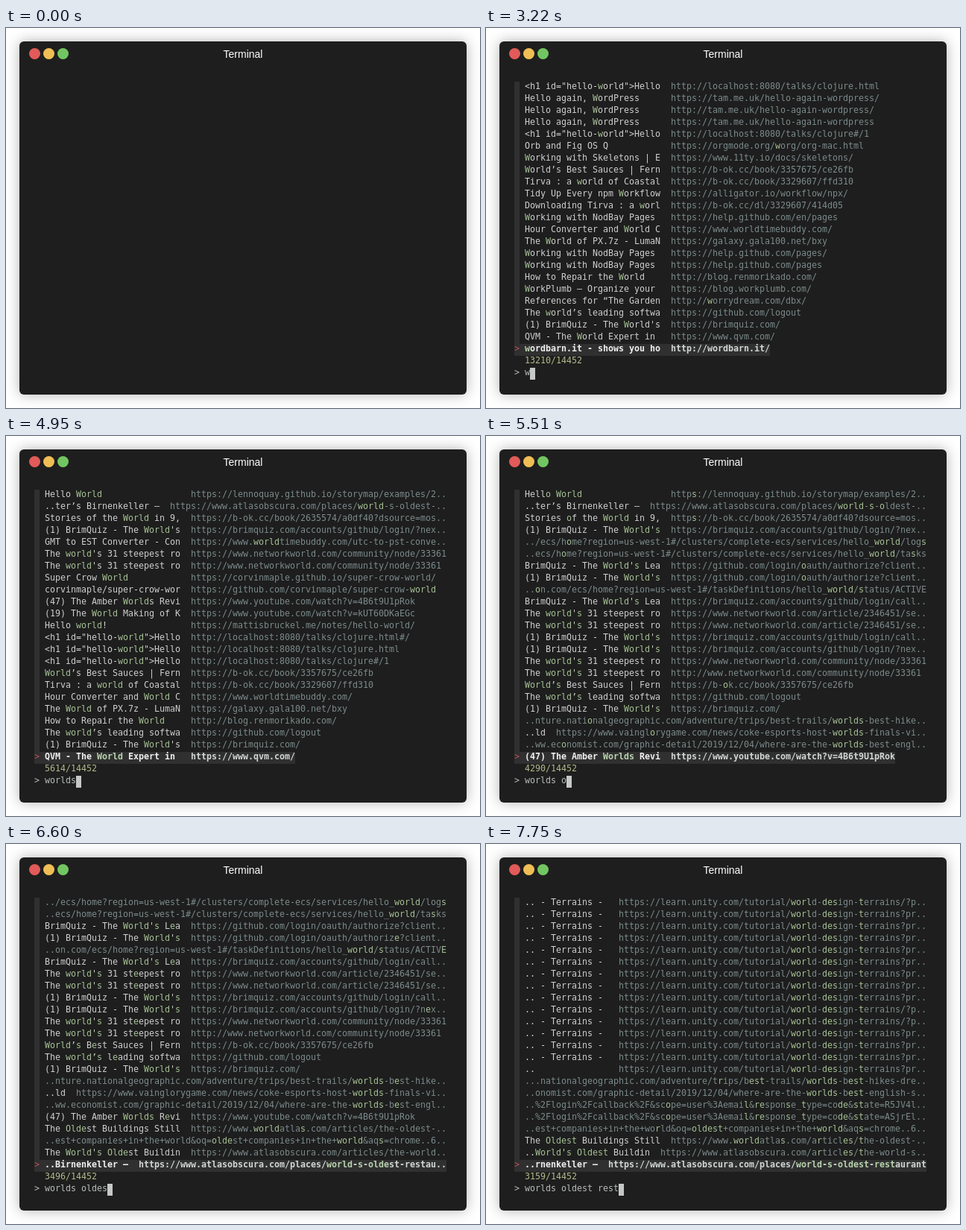
Recreate the animation shown at these times as an HTML page. Size 636 by 510 pixels, loop 8000 ms.

```html
<!DOCTYPE html>
<html lang="en">
<head>
<meta charset="utf-8">
<title>Terminal</title>
<style>
  html, body { margin: 0; width: 100%; height: 100%; overflow: hidden; background: #fff; }
  #stage { position: relative; width: 636px; height: 510px; overflow: hidden; }
  #window {
    position: absolute; left: 18px; top: 18px; width: 600px; height: 474px;
    border-radius: 6px; background: #1e1e1e; box-shadow: 0 0 18px rgba(0, 0, 0, .3);
  }
  .button { position: absolute; top: 27px; width: 15px; height: 15px; border-radius: 50%; }
  #title {
    position: absolute; left: 18px; top: 27px; width: 600px; text-align: center; color: #fff;
    font: 14px/16px "Liberation Sans", Arial, sans-serif;
  }
  #screen { font: 11.63px/14px "DejaVu Sans Mono", monospace; color: #cfcfcf; }
  .text { position: absolute; white-space: pre; height: 14px; }
  .fill { position: absolute; height: 16px; background: #303030; }
  .url { color: #7c8a8a; }
  .hit { color: #a6c194; }
  .selected { font-weight: bold; color: #f0f0f0; }
  .selected .url { color: #d2d6d6; }
  .selected .hit { color: #b9d3ae; }
  .pointer { color: #b9505e; }
  .count { color: #b1ba8a; }
  .path { color: #94dcea; }
  .branch { color: #6d6d6d; }
  .arrow { color: #a2cfe8; }
  .command { color: #b5bd74; }
  .input { color: #b9bdbb; }
  .cursor { background: #c5c8c6; }
</style>
</head>
<body>
<div id="stage">
  <div id="window"></div>
  <div class="button" style="left:31px;background:#e25a5a"></div>
  <div class="button" style="left:50px;background:#f0be55"></div>
  <div class="button" style="left:69px;background:#72c661"></div>
  <div id="title">Terminal</div>
  <div id="screen"></div>
</div>
<script>
const LOOP = 8000, CELL = 7, LINE = 16, LEFT = 38, TOP = 72, LAST = 22;
const QUERY = 'worlds oldest rest';
const screen = document.getElementById('screen');

// "title | url" puts the url in its own column; other lines stay as written.
const lines = text => text.trim().split('\n').map(line => {
  const [title, url] = line.trim().split(' | http');
  return url ? title.padEnd(28) + 'http' + url : title;
});

const lesson = flags => [...flags].map(flag =>
  (flag === 'x' ? '..' : '.. - Terrains -').padEnd(18) +
  'https://learn.unity.com/tutorial/world-design-terrains' + (flag === '/' ? '/?p..' : '?pr..'));

const work = lines(`
<h1 id="hello-world">Hello | http://localhost:8080/talks/clojure.html
Hello again, WordPress | https://tam.me.uk/hello-again-wordpress/
Hello again, WordPress | http://tam.me.uk/hello-again-wordpress/
Hello again, WordPress | https://tam.me.uk/hello-again-wordpress
<h1 id="hello-world">Hello | http://localhost:8080/talks/clojure#/1
Orb and Fig OS Q | https://orgmode.org/worg/org-mac.html
Working with Skeletons | E | https://www.11ty.io/docs/skeletons/
World’s Best Sauces | Fern | https://b-ok.cc/book/3357675/ce26fb
Tirva : a world of Coastal | https://b-ok.cc/book/3329607/ffd310
Tidy Up Every npm Workflow | https://alligator.io/workflow/npx/
Downloading Tirva : a worl | https://b-ok.cc/dl/3329607/414d05
Working with NodBay Pages | https://help.github.com/en/pages
Hour Converter and World C | https://www.worldtimebuddy.com/
The World of PX.7z - LumaN | https://galaxy.gala100.net/bxy
Working with NodBay Pages | https://help.github.com/pages/
Working with NodBay Pages | https://help.github.com/pages
How to Repair the World | http://blog.renmorikado.com/
WorkPlumb — Organize your | https://blog.workplumb.com/
References for “The Garden | http://worrydream.com/dbx/
The world’s leading softwa | https://github.com/logout
(1) BrimQuiz - The World's | https://brimquiz.com/
QVM - The World Expert in | https://www.qvm.com/
wordbarn.it - shows you ho | http://wordbarn.it/
`);

const world = lines(`
Hello World | https://lennoquay.github.io/storymap/examples/2..
..ter’s Birnenkeller —  https://www.atlasobscura.com/places/world-s-oldest-..
Stories of the World in 9, | https://b-ok.cc/book/2635574/a0df40?dsource=mos..
(1) BrimQuiz - The World's | https://brimquiz.com/accounts/github/login/?nex..
GMT to EST Converter - Con | https://www.worldtimebuddy.com/utc-to-pst-conve..
The world's 31 steepest ro | https://www.networkworld.com/community/node/33361
The world's 31 steepest ro | http://www.networkworld.com/community/node/33361
Super Crow World | https://corvinmaple.github.io/super-crow-world/
corvinmaple/super-crow-wor | https://github.com/corvinmaple/super-crow-world
(47) The Amber Worlds Revi | https://www.youtube.com/watch?v=4B6t9U1pRok
(19) The World Making of K | https://www.youtube.com/watch?v=kUT60DKaEGc
Hello world! | https://mattisbruckel.me/notes/hello-world/
<h1 id="hello-world">Hello | http://localhost:8080/talks/clojure.html#/
`).concat([0, 4, 7, 8, 12, 13, 16, 19, 20, 21].map(i => work[i]));

const old = lines(`
../ecs/home?region=us-west-1#/clusters/complete-ecs/services/hello_world/logs
..ecs/home?region=us-west-1#/clusters/complete-ecs/services/hello_world/tasks
BrimQuiz - The World's Lea | https://github.com/login/oauth/authorize?client..
(1) BrimQuiz - The World's | https://github.com/login/oauth/authorize?client..
..on.com/ecs/home?region=us-west-1#/taskDefinitions/hello_world/status/ACTIVE
BrimQuiz - The World's Lea | https://brimquiz.com/accounts/github/login/call..
The world's 31 steepest ro | https://www.networkworld.com/article/2346451/se..
The world's 31 steepest ro | https://www.networkworld.com/article/2346451/se..
(1) BrimQuiz - The World's | https://brimquiz.com/accounts/github/login/call..
(1) BrimQuiz - The World's | https://brimquiz.com/accounts/github/login/?nex..
The world's 31 steepest ro | https://www.networkworld.com/community/node/33361
The world's 31 steepest ro | http://www.networkworld.com/community/node/33361
World’s Best Sauces | Fern | https://b-ok.cc/book/3357675/ce26fb
The world’s leading softwa | https://github.com/logout
(1) BrimQuiz - The World's | https://brimquiz.com/
..nture.nationalgeographic.com/adventure/trips/best-trails/worlds-best-hike..
..ld  https://www.vainglorygame.com/news/coke-esports-host-worlds-finals-vi..
..ww.economist.com/graphic-detail/2019/12/04/where-are-the-worlds-best-engl..
(47) The Amber Worlds Revi | https://www.youtube.com/watch?v=4B6t9U1pRok
The Oldest Buildings Still | https://www.worldatlas.com/articles/the-oldest-..
..est+companies+in+the+world&oq=oldest+companies+in+the+world&aqs=chrome..6..
The World's Oldest Buildin | https://www.atlasobscura.com/articles/the-world..
..Birnenkeller —  https://www.atlasobscura.com/places/world-s-oldest-restau..
`);

const worlds = [...world.slice(0, 4), ...old.slice(0, 19)];
const english = '..onomist.com/graphic-detail/2019/12/04/where-are-the-worlds-best-english-s..';
const restaurant = '..rnenkeller —  https://www.atlasobscura.com/places/world-s-oldest-restaurant';
const oldest = [
  ...lesson('////????????/??'), english, ...lesson('??x'), ...old.slice(19, 22), restaurant
];
const token = state =>
  `..%2Flogin%2Fcallback%2F&scope=user%3Aemail&response_type=code&state=${state}..`;
const rest = [
  ...lesson('/????????//???x'),
  '...nationalgeographic.com/adventure/trips/best-trails/worlds-best-hikes-dre..',
  english, token('R5JV4l'), token('ASjrEl'), old[20], old[19],
  "..World's Oldest Buildin  https://www.atlasobscura.com/articles/the-world-s..",
  restaurant
];

// Shell: [ms, stage]. Finder: [ms, list, letters filtered by, letters typed, matches, total]
const steps = [
  [0, 0], [30, 1], [70, 2], [2520, 3],
  [2700, [], 0, 0, 0, 0], [2780, work, 0, 0, 6100, 6100], [2860, work, 0, 0, 14452],
  [3120, work, 0, 1, 14452], [3220, work, 1, 1, 13210],
  [3360, work, 1, 2, 13210], [3460, work, 2, 2, 11873],
  [3570, work, 2, 3, 11873], [3670, work, 3, 3, 9745],
  [4080, work, 3, 4, 9745], [4180, world, 4, 4, 6120],
  [4740, world, 4, 5, 6120], [4840, world, 5, 5, 5614],
  [4950, world, 5, 6, 5614], [5050, worlds, 6, 6, 4417],
  [5230, worlds, 6, 7, 4417],
  [5410, worlds, 6, 8, 4417], [5510, worlds, 8, 8, 4290],
  [5690, worlds, 8, 9, 4290], [5790, old, 9, 9, 3960],
  [5930, old, 9, 10, 3960], [5950, old, 10, 10, 3701],
  [6130, old, 10, 11, 3701], [6150, old, 11, 11, 3496],
  [6580, old, 11, 12, 3496], [6610, oldest, 12, 12, 3320],
  [6700, oldest, 12, 13, 3320], [6730, oldest, 13, 13, 3187],
  [6980, oldest, 13, 14, 3187],
  [7200, oldest, 13, 15, 3187], [7230, oldest, 15, 15, 3164],
  [7310, oldest, 15, 16, 3164], [7340, oldest, 16, 16, 3162],
  [7580, oldest, 16, 17, 3162], [7610, rest, 17, 17, 3160],
  [7720, rest, 17, 18, 3160], [7750, rest, 18, 18, 3159]
];

function add(parent, className, text = '') {
  const node = document.createElement(parent === screen ? 'div' : 'span');
  node.className = className;
  node.textContent = text;
  return parent.appendChild(node);
}

function place(node, col, row, rise = 0) {
  node.style.left = LEFT + col * CELL + 'px';
  node.style.top = TOP + row * LINE - rise + 'px';
  return node;
}

const write = (col, row, className, text) =>
  place(add(screen, 'text ' + className, text), col, row, 1);

function fill(col, row, cells, className = '') {
  place(add(screen, 'fill ' + className), col, row).style.width = cells * CELL + 'px';
}

// Tightest fuzzy match, preferring the start of a word.
function match(text, term) {
  const s = text.toLowerCase();
  let best = [], low = Infinity;
  for (let i = s.indexOf(term[0]); i >= 0; i = s.indexOf(term[0], i + 1)) {
    let end = i - 1;
    for (const c of term) {
      end = s.indexOf(c, end + 1);
      if (end < 0) return best;
    }
    const found = [];
    let pos = end + 1;
    for (const c of [...term].reverse()) found.push(pos = s.lastIndexOf(c, pos - 1));
    const cost = end - pos - (/[a-z0-9]/.test(s[pos - 1] || ' ') ? 0 : .5);
    if (cost < low) { low = cost; best = found; }
  }
  return best;
}

function drawLine(text, row, terms) {
  const selected = row === LAST;
  fill(0, row, selected ? text.length + 2 : 1);
  if (selected) write(0, row, 'pointer', '>');
  const node = write(2, row, selected ? 'selected' : '', '');
  const hits = new Set(terms.flatMap(term => match(text, term)));
  const urlStart = Math.max(0, text.search(/https?:\/\//));
  const isLink = i => i >= urlStart;
  const kind = i => hits.has(i) ? 'hit' : isLink(i) ? 'url' : 'name';
  for (let i = 0, j; i < text.length; i = j) {
    for (j = i + 1; j < text.length && kind(j) === kind(i);) j++;
    add(node, kind(i), text.slice(i, j));
  }
}

function drawShell(stage) {
  if (stage > 0) {
    write(0, 1, 'path', '~/.dotfiles');
    write(0, 2, 'arrow', '❯');
  }
  if (stage > 1) write(12, 1, 'branch', 'master');
  if (stage > 2) write(2, 2, 'command', 'c');
}

function drawFinder(list, filtered, typed, count, total = 14452) {
  const terms = QUERY.slice(0, filtered).split(' ').filter(Boolean);
  list.forEach((text, row) => drawLine(text, row, terms));
  write(2, LAST + 1, 'count', `${count}/${total}`);
  write(0, LAST + 2, 'input', '>');
  write(2, LAST + 2, 'input', QUERY.slice(0, typed));
  fill(2 + typed, LAST + 2, 1, 'cursor');
}

let shown;
function tick() {
  const time = performance.now() % LOOP;
  const step = steps.findLast(([start]) => start <= time);
  if (step !== shown) {
    shown = step;
    screen.replaceChildren();
    const [, first, ...more] = step;
    if (Array.isArray(first)) drawFinder(first, ...more);
    else drawShell(first);
  }
  requestAnimationFrame(tick);
}
tick();
</script>
</body>
</html>
```
